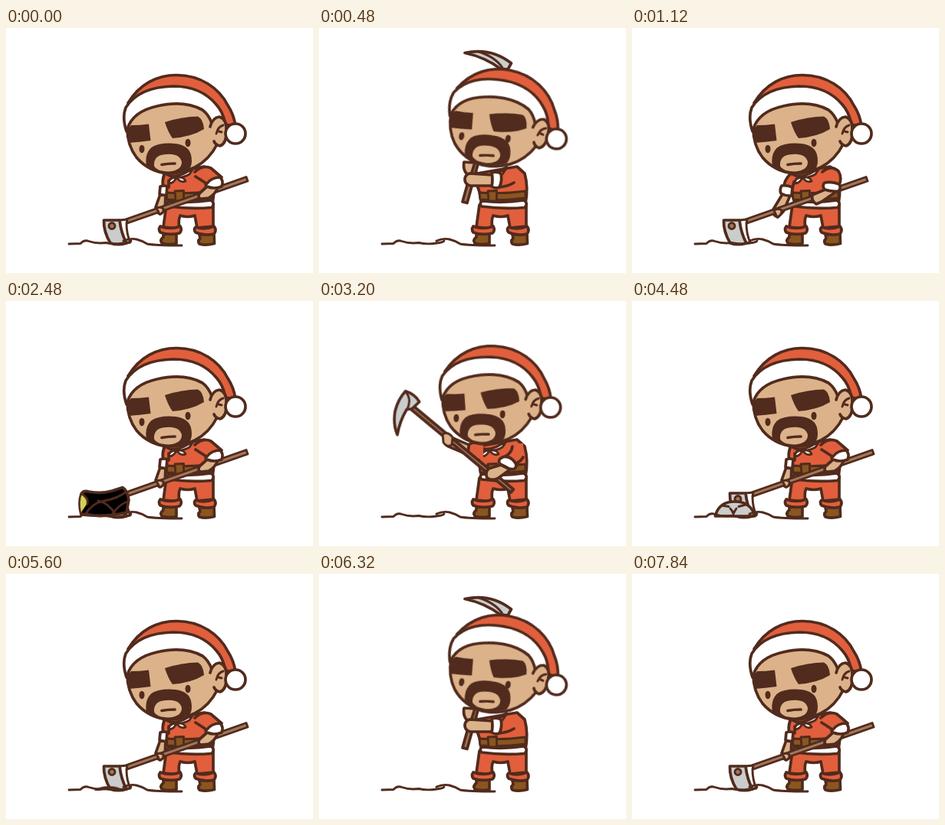
Write an HTML page without scripts that moves like this. It is 400x320 px and loops after 8 s.

```html
<!DOCTYPE html>
<html lang="en">
<head>
<meta charset="utf-8">
<title>Digging Santa</title>
<style>
html, body { margin: 0; width: 100%; height: 100%; overflow: hidden; background: #fff; }
svg { display: block; width: 400px; height: 320px; }
path, circle, ellipse { stroke-linejoin: round; stroke-linecap: round; }
.o { stroke: #512b1d; stroke-width: 3.7; }
.n { fill: none; }
.red { fill: #e15f3c; }
.white { fill: #fff; }
.skin { fill: #dcb28a; }
.dark { fill: #512b1d; }
.boot { fill: #8a561f; }
.wood { fill: #a4775a; }
.steel { fill: #cbcccc; }
.thin { stroke-width: 2.9; }
.flat { stroke: none; }

/* 1% of the loop is 80 ms */
.pose { animation: 8s step-end infinite; }
#a { animation-name: show-a; }
#b { animation-name: show-b; }
#c { animation-name: show-c; }
#d { animation-name: show-d; }
@keyframes show-a { 0%, 17%, 54%, 90%, 100% { opacity: 1 } 1%, 38%, 74% { opacity: 0 } }
@keyframes show-b { 14%, 51%, 87% { opacity: 1 } 0%, 17%, 54%, 90%, 100% { opacity: 0 } }
@keyframes show-c { 1%, 12%, 38%, 49%, 74%, 85% { opacity: 1 } 0%, 5%, 14%, 42%, 51%, 78%, 87%, 100% { opacity: 0 } }
@keyframes show-d { 5%, 42%, 78% { opacity: 1 } 0%, 12%, 49%, 85%, 100% { opacity: 0 } }

.head { transform-origin: 207px 154px; animation: head 8s linear infinite; }
@keyframes head {
  0%, 1%, 13%, 38%, 50%, 74%, 86%, 100% { transform: none }
  3%, 40%, 76% { transform: translate(2px, -3.5px) rotate(2.8deg) }
  6%, 43%, 79% { transform: translate(9px, -11px) rotate(11deg) }
  10%, 47%, 83% { transform: translate(9.5px, -11px) rotate(11.4deg) }
  12%, 49%, 85% { transform: translate(4px, -5px) rotate(4deg) }
}
/* the mouth stays level while the head tips back */
.mouth { transform-origin: 211px 172px; animation: mouth 8s linear infinite; }
@keyframes mouth {
  0%, 3%, 13%, 40%, 50%, 76%, 86%, 100% { transform: none }
  6%, 10%, 43%, 47%, 79%, 83% { transform: translate(2px, -1px) rotate(-5deg) }
}
.rest { animation: rest 8s ease-out infinite; }
@keyframes rest {
  0%, 19%, 38%, 56%, 74%, 92%, 100% { transform: none }
  17%, 54%, 90% { transform: translateX(-3px) }
}
.drag { animation: drag 8s linear infinite; }
@keyframes drag {
  0%, 15%, 52%, 88%, 100% { transform: none }
  17%, 54%, 90% { transform: translateX(5px) }
}
.swing { transform-origin: 228px 225px; animation: swing 8s linear infinite; }
@keyframes swing {
  0%, 1%, 38%, 74%, 100% { transform: rotate(-34deg) }
  2%, 39%, 75% { transform: rotate(-18deg) }
  3%, 40%, 76% { transform: rotate(0deg) }
  5%, 42%, 78% { transform: rotate(22deg) }
  12%, 49%, 85% { transform: rotate(-8deg) }
  14%, 51%, 87% { transform: rotate(-42deg) }
}
.reach { fill: none; animation: reach 8s linear infinite; }
@keyframes reach {
  0%, 1%, 38%, 74%, 100% { d: path("M203 198 L155 224") }
  2%, 39%, 75% { d: path("M203 198 L158 204") }
  3%, 40%, 76% { d: path("M203 198 L170 184") }
  5%, 42%, 78% { d: path("M203 198 L188 164") }
  12%, 49%, 85% { d: path("M203 198 L163 192") }
  14%, 51%, 87% { d: path("M203 198 L155 234") }
}
.wind { transform-origin: 210px 200px; animation: wind 8s linear infinite; }
@keyframes wind {
  0%, 5%, 42%, 78%, 100% { transform: rotate(-14deg) }
  6%, 43%, 79% { transform: none }
  10%, 47%, 83% { transform: rotate(1deg) }
  12%, 49%, 85% { transform: rotate(-10deg) }
}

.cat { animation: cat 8s linear infinite; }
@keyframes cat {
  0%, 22%, 38%, 100% { transform: translateY(48px) }
  25% { transform: translateY(-4px) }
  28%, 32% { transform: none }
}
.dome { animation: dome 8s linear infinite; }
@keyframes dome {
  0%, 54%, 74%, 90%, 98%, 100% { transform: translateY(30px) }
  56%, 65%, 92%, 94% { transform: none }
}
.marks { animation: marks 8s step-end infinite; }
@keyframes marks { 0%, 28%, 63%, 100% { opacity: 0 } 24%, 58% { opacity: 1 } }
</style>
</head>
<body>
<svg viewBox="0 0 400 320">
<defs>
  <clipPath id="soil"><path d="M0 0H400V283H0Z"/></clipPath>
  <g id="hoe" class="o">
    <path class="wood thin" d="M157 249.500 L313 194.500 L315 200 L158 255 Z"/>
    <path class="white thin" d="M148 251 L158 250 L157 255 Q157 269 162 280 L157 281 Q149 268 148 251 Z"/>
    <path class="steel" d="M127.500 251 L148 251 Q150 268 157 281 Q146 284.500 136 281 Q127 266 127.500 251 Z"/>
    <circle class="wood thin" cx="138" cy="258.500" r="4"/>
  </g>
</defs>

<!-- legs and trunk -->
<g class="o">
  <path class="boot" d="M205 269 H222 V281.500 Q212 284 203 281 Q200 277 205 273 Z"/>
  <path class="boot" d="M252 270 L271 269 L271.500 281.500 Q260 284.500 252 282 Q249 278 253 275 Z"/>
  <path class="red" d="M209 231 L205 260 L226 262 Q224 251 227 245 Q237 248 246 245 L249 261 L270 259 L270 231 Z"/>
  <path class="red" d="M201 259 Q214 264 227 259 Q230 264 226 268 Q212 271 201 267 Q198 263 201 259 Z"/>
  <path class="red" d="M247 260 Q259 264 271 259 Q275 264 271 269 Q258 272 247 267 Q244 263 247 260 Z"/>
  <path class="red" d="M206 190 Q204 202 209 214 L212 230 L269 230 Q273 208 268 190 L258 181 Z"/>
  <path class="boot thin" d="M209 215 Q240 217 269 213 V222 Q240 226 210 224 Z"/>
  <path class="boot thin" d="M220 213 L231.500 212.500 V226 H221 Z"/>
  <path class="white" d="M213 226 Q240 229 267 225 Q273 229 268 234.500 Q240 237 212 233 Q208 229 213 226 Z"/>
  <path class="white thin" d="M206 189 Q222 200 245 182 L239 191 Q230 196 222 195 Q213 195 206 189 Z"/>
  <path class="white thin" d="M222 195 Q212 195 212 203 Q219 203 222 195 Q228 203 234 200 Q232 194 222 195 Z"/>
</g>

<!-- hoe in the ground -->
<g id="a" class="pose"><g class="rest o">
  <path class="red" d="M206 192 Q203 200 205 208 L212 208 L212 199"/>
  <path class="skin" d="M201 217 L195 234 Q195 241 201 243 L207 238 L208 217 Z"/>
  <path class="white" d="M201 207 Q206 205 210 207 L209 218 Q204 219 200 217 Z"/>
  <use href="#hoe"/>
  <path class="skin thin" d="M196 235 Q201 233 205 236 Q206 242 200 243 Z"/>
  <path class="skin" d="M262 207 L252 216 Q249 223 255 223 L264 222 Q273 217 276 208 Z"/>
  <path class="red" d="M246 188 Q256 178 267 183 L281 195 L264 205 L247 194"/>
  <path class="white" d="M262 203 Q268 195 279 195 Q284 200 281 207 Q271 211 262 207 Q258 205 262 203 Z"/>
</g></g>

<!-- hoe reaching forward -->
<g id="b" class="pose" opacity="0"><g class="drag o">
  <path class="red" d="M206 191 Q198 199 198 208 L209 210 L211 201"/>
  <path class="skin" d="M196 217 L184 237 Q183 245 190 247 L197 240 L206 219 Z"/>
  <path class="white" d="M195 206 Q202 205 209 208 L208 219 Q201 220 194 216 Q192 211 195 206 Z"/>
  <use href="#hoe" x="-8"/>
  <path class="skin thin" d="M185 238 Q191 235 195 238 Q195 245 189 247 Z"/>
  <path class="skin" d="M254 210 L235 218 Q233 225 240 230 L247 227 L267 213 Z"/>
  <path class="red" d="M248 188 Q259 178 269 187 Q274 195 270 205 L252 203"/>
  <path class="white" d="M251 202 Q261 200 270 204 Q273 209 269 213 Q259 214 251 211 Q247 206 251 202 Z"/>
</g></g>

<!-- hoe lifted or falling -->
<g id="c" class="pose" opacity="0">
  <path class="reach" stroke="#512b1d" stroke-width="16"/>
  <path class="reach" stroke="#dcb28a" stroke-width="9"/>
  <path class="red o" d="M208 185 Q201 184 196 187 Q193 194 196 203 Q202 207 208 207"/>
  <path class="red flat" d="M206 187 H214 V206 H206 Z"/>
  <g class="swing o">
    <path class="wood" d="M120.500 135.500 L253.500 246 L250 250 L117 139.500 Z"/>
    <path class="steel" d="M112.500 118 Q125 122 130.500 132 L121 141 L114 142 Q105 157 102 175 Q96 161 99 144 Q103 128 112.500 118 Z"/>
    <path class="n thin" d="M112 118 Q121 128 115 141"/>
    <path class="skin thin" d="M161 174 Q168 170 174 178 L173 188 Q167 192 162 185 Z"/>
  </g>
  <g class="o">
    <path class="red flat" d="M252 186 H266 V212 L252 211 L241 205 Z"/>
    <path class="n" d="M252 190 Q251 199 241 204 M254 213 Q262 211 266 204"/>
    <path class="skin" d="M237 214 L221 219 Q216 224 219 231 Q227 236 234 231 L249 220 Z"/>
    <path class="white" d="M236 206 Q243 200 252 207 Q260 214 255 219 Q250 221 244 217 L236 213 Q233 209 236 206 Z"/>
  </g>
</g>

<!-- hoe behind the head -->
<g id="d" class="pose" opacity="0"><g class="o">
  <g class="wind">
    <path class="wood" d="M236.500 50 L242 52 L193 228.500 L187 227 Z"/>
    <path class="steel" d="M190 32.500 Q224 25 250.500 46 L246 54 L236 53 Q216 38 190 32.500 Z"/>
    <path class="n thin" d="M208 31 Q230 38 239 52"/>
  </g>
  <path class="skin" d="M189 175 Q187 186 194 192 L199 189 L203 176 Z"/>
  <path class="n" d="M234 208 Q246 207 254 202 M230 189 Q238 186 244 182"/>
  <path class="skin" d="M196 190 L226 192 V206 L197 206 Q190 204 190 198 Q190 192 196 190 Z"/>
  <path class="white" d="M225 189 Q232 187 237 190 Q239 200 235 208 Q230 210 225 207 Q227 198 225 189 Z"/>
</g></g>

<!-- head -->
<g class="head o">
  <path class="red" d="M159 98 C174 73 197 61.500 222 61.500 C254 61.500 278 79 289 101 Q297 113 299 128 L285 126 L262 110 Z"/>
  <path class="white" d="M157 135 Q151 117 156 104 Q173 77 218 76 Q254 76 274 100 Q282 109 285 122 L268 126 L212 122 Z"/>
  <path class="skin" d="M158 132 Q165 109 197 102 Q232 94 256 107 Q264 113 268 124 L275 152 Q265 172 246 182 Q229 190 211 190 Q185 187 170 169 Q158 153 158 132 Z"/>
  <path class="skin" d="M266 129 Q269 117 278 116 Q288 119 287 134 Q288 150 279 154 Q273 153 271 148"/>
  <path class="n thin" d="M283 127 Q276 129 274 138 M277 135 L281 136"/>
  <circle class="white" cx="299" cy="138" r="13"/>
  <path class="dark flat" d="M163 127 Q174 127 186 125.500 L188.500 147 Q174 149 160 150 Q157 141 158 133 Z"/>
  <path class="dark flat" d="M207 123 Q230 115.500 250 115.500 Q257 119 258 132 Q242 142 217 144 Q211 136 207 123 Z"/>
  <ellipse class="dark flat" cx="177" cy="158" rx="3.500" ry="5.300"/>
  <ellipse class="dark flat" cx="237" cy="150" rx="3.500" ry="5.300"/>
  <g class="mouth">
    <path class="dark" d="M185 181 Q182 166 190 158 Q198 152 216 152.500 Q235 153 239 165 Q242 177 237 184 Q224 189 209 189 Q194 188 185 181 Z"/>
    <path class="skin flat" d="M193 180 Q192 166 208 165 Q226 163 229 175 Q229 186 212 187.500 Q196 187 193 180 Z"/>
    <path class="n" d="M203 178.500 Q211 177 220 177"/>
  </g>
</g>

<!-- finds -->
<g clip-path="url(#soil)">
  <g class="cat o">
    <path fill="#000" d="M98 252 Q101 247 108 249 Q124 252 138 248 L152 243.500 Q158 247 160 260 L157 276 Q130 283 98 279 Q94 264 98 252 Z"/>
    <path class="flat" fill="#d6cf57" d="M99 252 Q107 259 106 264 L98 276 Q95 262 99 252 Z"/>
    <path class="n thin" d="M99 252 Q108 258 106 265 M104 278 Q112 264 128 261 Q145 258 157 249 M120 261 Q134 264 142 278 M158 262 Q147 266 138 279"/>
  </g>
  <g class="dome o">
    <path class="steel" d="M108.500 281 Q113 262 134 262 Q155 262 160 281 Z"/>
    <path class="n thin" d="M117 267 L126 268.500 M139 268.500 L148 266 M128 271 Q131 274 132 278 Q134 274 136 271"/>
  </g>
</g>
<path class="o n thin" d="M82 282 L97 281.500 Q102 276 108 278.500 Q118 282 130 280.500 Q140 283 153 281 Q163 280 163 278 M153 278 Q162 274 170 276 Q178 278 184 282 Q194 284 229 284"/>
<path class="marks o n" opacity="0" d="M64 264.500 L77 267.500 M86 240 L93 245 M166 241 L173 238"/>
</svg>
</body>
</html>
```
